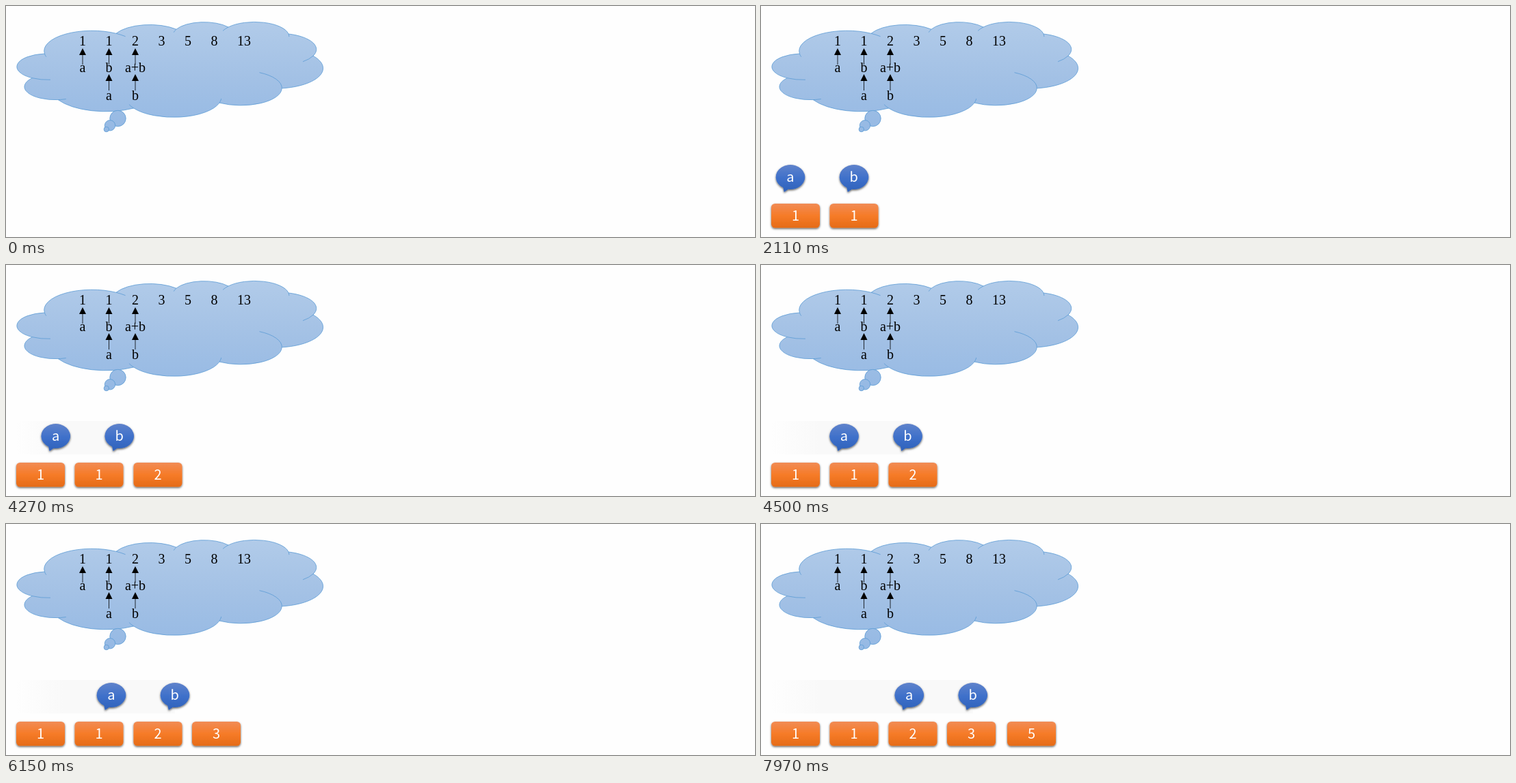
Write an HTML page that moves like this. It is 1095 by 339 pixels and loops after 8000 ms.

```html
<!DOCTYPE html>
<html lang="en">
<head>
<meta charset="utf-8">
<title>Fibonacci sequence</title>
<style>
  html, body { margin: 0; width: 100%; height: 100%; overflow: hidden; background: #fefefe; }
  svg { display: block; }
  text { text-anchor: middle; font-size: 20px; }
  .serif { font-family: "Liberation Serif", "Times New Roman", serif; }
  .sans { font-family: "Noto Sans CJK SC", "Noto Sans CJK JP", "Noto Sans", sans-serif; font-weight: 300; fill: #fff; }
  .outline { stroke: #5b9bd5; stroke-width: .8; }
</style>
</head>
<body>
<svg id="stage" width="1095" height="339" viewBox="0 0 1095 339">
  <defs>
    <linearGradient id="sky" gradientUnits="userSpaceOnUse" x1="0" y1="23" x2="0" y2="185">
      <stop offset="0" stop-color="#b1cbe9"/><stop offset=".5" stop-color="#a3c1e5"/><stop offset="1" stop-color="#95b9e4"/>
    </linearGradient>
    <linearGradient id="orange" x2="0" y2="1">
      <stop offset="0" stop-color="#f18c55"/><stop offset=".5" stop-color="#f67b28"/><stop offset="1" stop-color="#e56b17"/>
    </linearGradient>
    <linearGradient id="blue" x2="0" y2="1">
      <stop offset="0" stop-color="#6083cb"/><stop offset=".5" stop-color="#3e70ca"/><stop offset="1" stop-color="#2e61ba"/>
    </linearGradient>
    <linearGradient id="fade" gradientUnits="userSpaceOnUse" x1="15" y1="0" x2="85" y2="0">
      <stop offset="0" stop-color="#fefefe"/><stop offset="1" stop-color="#f9f9f9"/>
    </linearGradient>
    <filter id="shadow" x="-25%" y="-25%" width="150%" height="160%">
      <feDropShadow dx="0" dy="1.5" stdDeviation="1.8" flood-color="#000" flood-opacity=".63"/>
    </filter>
  </defs>
</svg>
<script>
const stage = document.getElementById('stage');

function add(tag, attrs, parent = stage, content = '') {
  const node = document.createElementNS('http://www.w3.org/2000/svg', tag);
  for (const key in attrs) node.setAttribute(key, attrs[key]);
  node.textContent = content;
  parent.appendChild(node);
  return node;
}

const label = (content, x, y, font, parent) => add('text', { x, y, class: font }, parent, content);

function fibonacci(count) {
  const values = [1, 1];
  while (values.length < count) values.push(values.at(-1) + values.at(-2));
  return values.slice(0, count);
}

// Every lobe is an ellipse of the same aspect: end point, horizontal radius and
// overrun in degrees (positive: this arc runs on, negative: the next starts early).
const ASPECT = 2.354;
const lobes = [
  [161, 40.3, 70, 14], [249, 34.2, 45.3 + 10, -14], [325, 31, 45.3, -17], [413, 41, 50.4, 11],
  [449, 73.2, 55.3, 26], [403.3, 120.8, 70, -64], [312, 142.1, 60, -12], [186.7, 150, 70, 12],
  [76.2, 137.6, 80, -15], [38.4, 105.7, 45.2, -35], [56.4, 70, 45.2, -9]
];

function drawCloud() {
  const put = ([x, y]) => `${x.toFixed(2)} ${y.toFixed(2)}`;
  const arc = (r, to) => `A${r} ${r / ASPECT} 0 0 1 ${put(to)}`;
  const arcs = lobes.map(([x, y, r], i) => {
    const [px, py] = lobes.at(i - 1);
    const dx = x - px, dy = (y - py) * ASPECT, chord = Math.hypot(dx, dy);
    const k = Math.sqrt(r * r - chord * chord / 4) / chord;
    const cx = (x + px) / 2 - dy * k, cy = (y + py) / 2 + dx * k / ASPECT;
    const turn = ([ax, ay], degrees) => {
      const a = Math.atan2((ay - cy) * ASPECT, ax - cx) + degrees * Math.PI / 180;
      return [cx + r * Math.cos(a), cy + r * Math.sin(a) / ASPECT];
    };
    return { r, turn, end: [x, y] };
  });
  let inner = '';
  arcs.forEach(({ r, turn, end }, i) => {
    const overrun = lobes[i][3], next = arcs[(i + 1) % arcs.length];
    inner += overrun > 0
      ? `M${put(end)}${arc(r, turn(end, overrun))}`
      : `M${put(next.turn(end, overrun))}${arc(next.r, end)}`;
  });
  const outline = `M${put(arcs.at(-1).end)}${arcs.map(a => arc(a.r, a.end)).join('')}Z`;
  add('path', { d: outline, fill: 'url(#sky)', class: 'outline' });
  add('path', { d: inner, fill: 'none', class: 'outline' });
  for (const [cx, cy, r] of [[163.5, 165, 12], [152, 175.3, 8], [146.8, 181, 4]])
    add('circle', { cx, cy, r: r - .3, fill: 'url(#sky)', class: 'outline' });
}

function drawArrow(x, tip) {
  add('path', { d: `M${x} ${tip + 24}V${tip + 8}`, stroke: '#000', 'stroke-width': .8 });
  add('path', { d: `M${x} ${tip}l5 10h-10z` });
}

function drawNotes() {
  const column = i => 112 + 38.5 * i;
  fibonacci(7).forEach((n, i) => label(n, column(i) + (n > 9 ? 5 : 0), 58, 'serif'));
  const noteRow = (names, first, tip, baseline) => names.forEach((name, i) => {
    label(name, column(first + i), baseline, 'serif');
    drawArrow(column(first + i), tip);
  });
  noteRow(['a', 'b', 'a+b'], 0, 62, 97);
  noteRow(['a', 'b'], 1, 100, 138);
}

function makeBox(value, cx) {
  const group = add('g', {});
  add('rect', { x: cx - 35.5, y: 290, width: 71, height: 35.5, rx: 5.5, fill: 'url(#orange)', filter: 'url(#shadow)' }, group);
  label(value, cx, 315, 'sans', group);
  return group;
}

// Drawn around x = 0; the balloon is centred at y = 251.
function makePointer(name) {
  const group = add('g', {});
  add('path', {
    d: 'M-10.4 266.6A21.3 18 0 1 1 -2.8 268.8L-9 273Z',
    fill: 'url(#blue)', filter: 'url(#shadow)'
  }, group);
  label(name, 0, 258, 'sans', group);
  return group;
}

drawCloud();
drawNotes();

const LOOP = 8000, STEP = 46.5, STEPS = 20, GAP = 93, POINTERS_FROM = 2110;
const boxSlots = [[50.5, 1220], [136, 1220], [222, 3050], [307.5, 5020], [395.5, 7040]]; // centre, appearance
const moves = [[3980, 97], [5900, 71.5], [7830, 85]]; // start, distance

const trail = add('rect', { x: 15, y: 229, height: 49, fill: 'url(#fade)' });
const boxes = fibonacci(boxSlots.length).map((value, i) => makeBox(value, boxSlots[i][0]));
const pointers = ['a', 'b'].map(makePointer);

// Slow start, quick middle, long settling: cubic pieces through time, value, slope.
const easeKeys = [[0, 0, 0], [.2, .062, .5], [.6, .81, .6], [1, 1, 0]];

function ease(t) {
  const i = Math.max(1, easeKeys.findIndex(key => t <= key[0]));
  const [t0, p0, m0] = easeKeys[i - 1], [t1, p1, m1] = easeKeys[i];
  const h = t1 - t0, u = (t - t0) / h, v = 1 - u;
  return p0 + (p1 - p0) * u * u * (3 - 2 * u) + h * u * v * (m0 * v - m1 * u);
}

const show = (node, on) => node.setAttribute('visibility', on ? 'visible' : 'hidden');

function render(time) {
  let x = 42.8;
  for (const [start, distance] of moves) {
    if (time < start) break;
    x += distance * ease(Math.min(1, (Math.floor((time - start) / STEP) + 1) / STEPS));
  }
  boxes.forEach((box, i) => show(box, time >= boxSlots[i][1]));
  pointers.forEach((pointer, i) => {
    show(pointer, time >= POINTERS_FROM);
    pointer.setAttribute('transform', `translate(${x + i * GAP} 0)`);
  });
  show(trail, time >= moves[0][0] + STEP);
  trail.setAttribute('width', x + GAP - 15);
}

const origin = performance.now();
function tick() {
  render((performance.now() - origin) % LOOP);
  requestAnimationFrame(tick);
}
tick();
</script>
</body>
</html>
```
